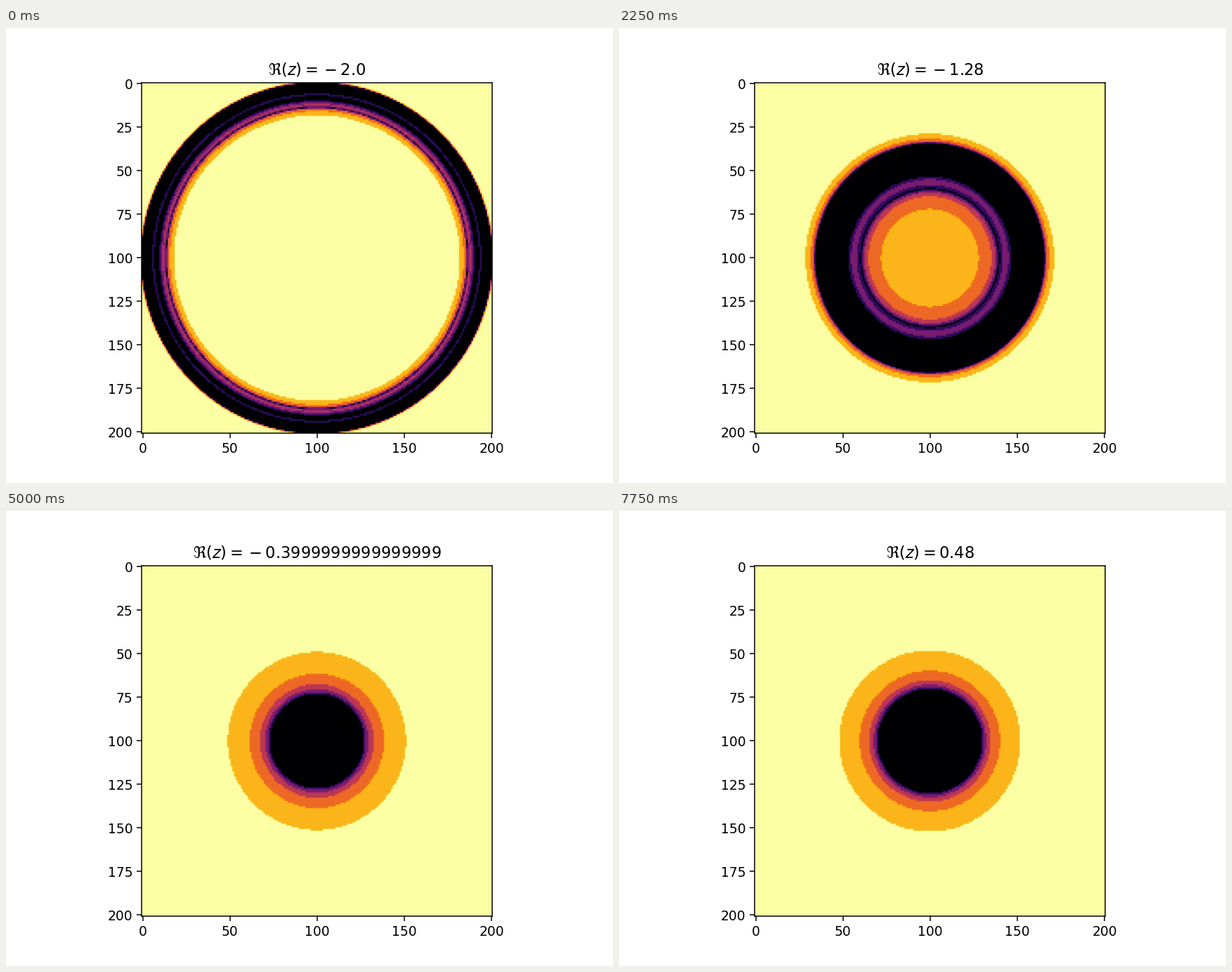
Write a matplotlib script that moves like this. It is 864 px wide and 648 px high and loops after 8 s.

```python
import numpy as np
import matplotlib.pyplot as plt
from matplotlib.animation import FuncAnimation

FRAMES, INTERVAL = 32, 250
LIMIT = 12       # squared size at which a point counts as escaped
SKIP, STEPS = 2, 6

axis = np.linspace(-2, 2, 201)
v, w = np.meshgrid(axis, axis)
radius2 = v ** 2 + w ** 2
reals = np.linspace(-2, 2, 51)


def escape_levels(x):
    """Iterate z -> z*z + c on split-quaternions, with z = p + q*c."""
    square = radius2 - x ** 2
    size2 = radius2 + x ** 2
    p, q = np.zeros_like(square), np.ones_like(square)
    levels = np.zeros_like(square)
    for step in range(1, SKIP + STEPS):
        p, q = p * p + q * q * square, 2 * p * q + 1
        if step >= SKIP:
            levels += p * p + q * q * size2 > LIMIT
    return levels


def caption(x):
    # The empty group keeps the minus sign spaced like an operator.
    gap = "{}" if x < 0 else ""
    return rf"$\Re(z) = {gap}{float(x)}$"


fig, ax = plt.subplots(figsize=(6.4, 4.8), dpi=135)
image = ax.imshow(escape_levels(reals[0]), cmap="inferno", vmin=0, vmax=STEPS)
title = ax.set_title(caption(reals[0]))


def update(i):
    image.set_data(escape_levels(reals[i]))
    title.set_text(caption(reals[i]))
    return image, title


anim = FuncAnimation(fig, update, frames=FRAMES, interval=INTERVAL,
                     repeat=True, repeat_delay=0)
plt.show()
```
